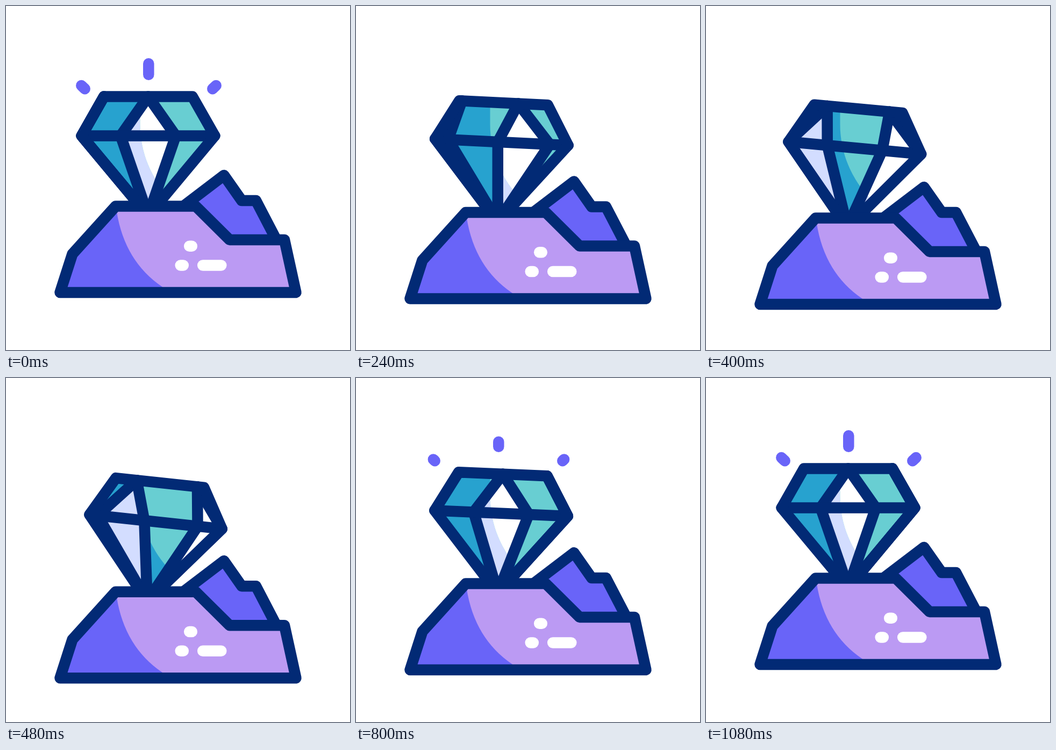
Animation, 640 px wide and 640 px high, one loop 1.24 s. Source, as an HTML page with a canvas:

```html
<!DOCTYPE html>
<html lang="en">
<head>
<meta charset="utf-8">
<title>Gem on a rock</title>
<style>
  html, body { margin: 0; width: 100%; height: 100%; overflow: hidden; background: #fff; }
  canvas { display: block; width: 640px; height: 640px; }
</style>
</head>
<body>
<canvas id="stage"></canvas>
<script>
const LOOP = 1240, STEP = 40, LINE = 20.5;
const NAVY = '#022a75', PURPLE = '#6964f8', VIOLET = '#bb9af3', WHITE = '#fff';
const DARK = { tint: '#27a2cf', clear: '#d3ddff' };
const LIGHT = { tint: '#68ced2', clear: WHITE };

const canvas = document.getElementById('stage');
const ctx = canvas.getContext('2d');
const ratio = window.devicePixelRatio || 1;
canvas.width = canvas.height = 640 * ratio;

const clamp = (v, lo, hi) => Math.min(hi, Math.max(lo, v));
const rad = deg => deg * Math.PI / 180;
const smooth = s => s * s * (3 - 2 * s);

// Eased 0..1 between two times, like cubic-bezier(a, 0, b, 1).
function ease(t, from, to, a = 1 / 3, b = 2 / 3) {
  const u = clamp((t - from) / (to - from), 0, 1);
  let lo = 0, hi = 1;
  for (let i = 0; i < 24; i++) {
    const s = (lo + hi) / 2, r = 1 - s;
    if (3 * a * s * r * r + 3 * b * s * s * r + s * s * s < u) lo = s; else hi = s;
  }
  return smooth((lo + hi) / 2);
}

function trace(points, closed) {
  ctx.beginPath();
  points.forEach(([x, y], i) => i ? ctx.lineTo(x, y) : ctx.moveTo(x, y));
  if (closed) ctx.closePath();
}

function fill(points, color) {
  trace(points, true);
  ctx.fillStyle = color;
  ctx.fill();
}

function stroke(points, color, closed = false) {
  trace(points, closed);
  ctx.strokeStyle = color;
  ctx.stroke();
}

const ROCK = [[328, 374], [405.5, 315], [438.5, 362], [465, 362], [503, 435]];
const MOUND = [[204, 372.5], [353, 372.5], [416, 435], [518, 435],
               [539.5, 533], [100.5, 533], [123.5, 461.5]];
const DASHES = [[341.2, 345.8, 446.7], [324.7, 329.8, 482.5], [366.2, 400.3, 482.5]];

function drawMound(drop) {
  ctx.save();
  ctx.translate(0, drop);
  fill([...ROCK, [416, 435], [353, 372.5]], PURPLE);
  stroke(ROCK, NAVY);

  fill(MOUND, PURPLE);
  ctx.save();
  trace(MOUND, true);
  ctx.clip();
  ctx.beginPath();
  ctx.moveTo(204, 365);
  ctx.lineTo(206, 383);
  ctx.quadraticCurveTo(221, 475, 290, 522);
  ctx.lineTo(305, 533);
  ctx.lineTo(560, 533);
  ctx.lineTo(560, 365);
  ctx.fillStyle = VIOLET;
  ctx.fill();
  ctx.restore();
  stroke(MOUND, NAVY, true);

  DASHES.forEach(([x1, x2, y]) => stroke([[x1, y], [x2, y]], WHITE));
  ctx.restore();
}

const AXIS = 264.5, PIVOT = 374;
const TABLE_Y = 168.5, GIRDLE_Y = 241.5, CULET_Y = 390;

function drawGem(drop, tilt, spin) {
  const cos = Math.cos(rad(tilt)), sin = Math.sin(rad(tilt));
  const place = (x, y) => {
    const h = y - PIVOT;
    return [AXIS + x * cos - h * sin, PIVOT + drop + x * sin + h * cos];
  };
  // Points turned out of sight rest on the outline.
  const table = deg => place(82.3 * Math.sin(rad(clamp(deg, -90, 90))), TABLE_Y);
  const girdle = deg => place(134 * Math.sin(rad(clamp(deg, -67.5, 67.5))), GIRDLE_Y);
  const culet = place(0, CULET_Y);
  const outline = [table(-90), table(90), girdle(90), culet, girdle(-90)];
  const clears = [spin - 90, spin];

  const paint = colors => {
    fill(outline, colors.tint);
    for (const a of clears) {
      fill([table(a), girdle(a + 22.5), culet, girdle(a - 22.5)], colors.clear);
    }
  };

  paint(DARK);
  // The lit side keeps its place while the gem moves.
  ctx.save();
  ctx.beginPath();
  ctx.moveTo(249.5, 100);
  ctx.lineTo(249.5, 220);
  ctx.arc(447.5, 220, 198, Math.PI, Math.PI / 2, true);
  ctx.lineTo(560, 418);
  ctx.lineTo(560, 100);
  ctx.clip();
  paint(LIGHT);
  ctx.restore();

  for (const a of clears) {
    for (const side of [-22.5, 22.5]) stroke([table(a), girdle(a + side), culet], NAVY);
  }
  stroke([girdle(-90), girdle(90)], NAVY);
  stroke(outline, NAVY, true);
}

// Outer end, inner end.
const SPARKS = [
  [[140.3, 148], [146.7, 154.2]],
  [[265.3, 107.3], [265.3, 127.8]],
  [[390.7, 148], [384.3, 154.2]]
];

function drawSparks(t) {
  const leaving = t < 400;
  const length = leaving ? 1 - ease(t, 0, 228) : ease(t, 630, 1000);
  if (length <= 0.0001) return;
  for (const [outer, inner] of SPARKS) {
    const [from, to] = leaving ? [outer, inner] : [inner, outer];
    const tip = from.map((v, i) => v + (to[i] - v) * length + (i ? 0.01 : 0));
    stroke([from, tip], PURPLE);
  }
}

function draw(t) {
  const sink = t < 540 ? ease(t, 0, 540, 0.305, 0.65)
                       : 1 - ease(t, 540, 1080, 0.2, 0.54);
  ctx.setTransform(ratio, 0, 0, ratio, 0, 0);
  ctx.fillStyle = WHITE;
  ctx.fillRect(0, 0, 640, 640);
  ctx.lineWidth = LINE;
  ctx.lineCap = ctx.lineJoin = 'round';
  drawSparks(t);
  drawGem(26 * sink, 6.3 * sink, 90 * ease(t, 0, 800));
  drawMound(26 * sink);
}

const start = performance.now();
function tick() {
  const t = (performance.now() - start) % LOOP;
  draw(Math.floor(t / STEP) * STEP);
  requestAnimationFrame(tick);
}
tick();
</script>
</body>
</html>
```
